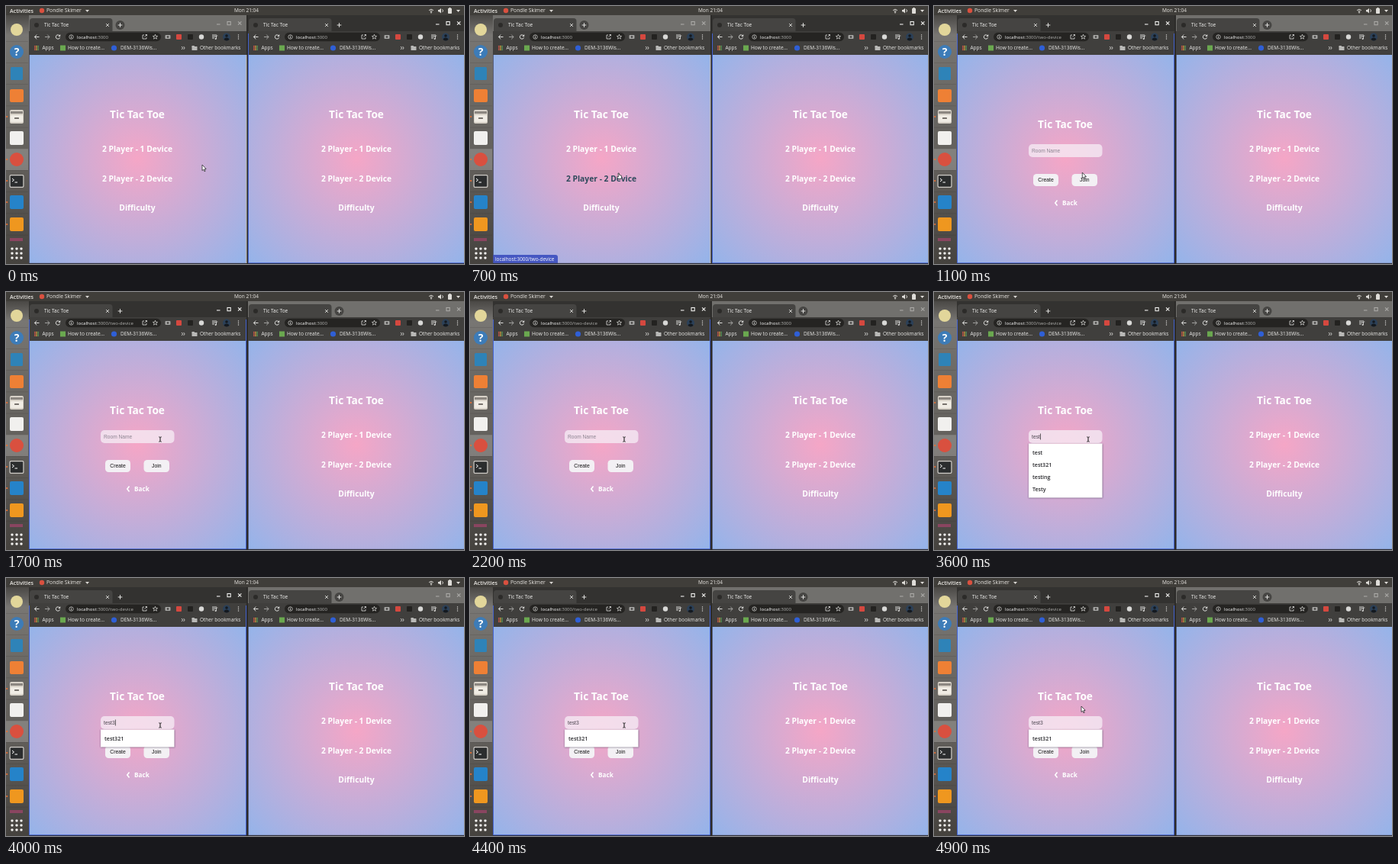
Write an HTML page with a canvas that moves like this. It is 600 px wide and 338 px high and loops after 5 s.

```html
<!DOCTYPE html>
<html lang="en">
<head>
<meta charset="utf-8">
<title>Tic Tac Toe</title>
<style>
html, body { margin: 0; width: 100%; height: 100%; overflow: hidden; background: #2c2b29; }
canvas { display: block; width: 600px; height: 338px; }
</style>
</head>
<body>
<canvas id="stage"></canvas>
<script>
const W = 600, H = 338, LOOP = 5000;
const NAVIGATE = 1000;
const UI = '"Open Sans", "Noto Sans", sans-serif';
const FORM = '"Liberation Sans", Arial, sans-serif';
const canvas = document.getElementById('stage');
const ctx = canvas.getContext('2d');
const ratio = window.devicePixelRatio || 1;
canvas.width = W * ratio;
canvas.height = H * ratio;

// Cursor path: time, x, y
const path = [
  [0, 257, 208], [100, 257, 208], [600, 194, 219], [1050, 194, 219],
  [1500, 202, 193], [4500, 202, 193], [4900, 193, 168], [5000, 193, 168]
];
// Typed text: time, value
const keys = [[2500, 't'], [2700, 'te'], [3000, 'tes'], [3200, 'test'], [3800, 'test3']];
const history = ['test', 'test321', 'testing', 'Testy'];

function rect(x, y, w, h, color, r = 0) {
  ctx.fillStyle = color;
  ctx.beginPath();
  ctx.roundRect(x, y, w, h, r);
  ctx.fill();
}

function circle(x, y, r, color) {
  ctx.fillStyle = color;
  ctx.beginPath();
  ctx.arc(x, y, r, 0, Math.PI * 2);
  ctx.fill();
}

function trace(points) {
  ctx.beginPath();
  for (let i = 0; i < points.length; i += 2) ctx.lineTo(points[i], points[i + 1]);
}

function line(points, color, width = 1) {
  trace(points);
  ctx.strokeStyle = color;
  ctx.lineWidth = width;
  ctx.stroke();
}

function poly(points, color) {
  trace(points);
  ctx.closePath();
  ctx.fillStyle = color;
  ctx.fill();
}

// y is the middle of the capitals
function text(str, x, y, size, color = '#fff', { weight = 400, align = 'left', font = UI } = {}) {
  ctx.font = `${weight} ${size}px ${font}`;
  ctx.textAlign = align;
  ctx.fillStyle = color;
  ctx.fillText(str, x, y + size * 0.357);
  return ctx.measureText(str).width;
}

function at(x, y, draw) {
  ctx.save();
  ctx.translate(x, y);
  draw();
  ctx.restore();
}

function topBar() {
  rect(0, 0, W, 12, '#403e3a');
  text('Activities', 5, 6, 7.1, '#eceae6', { weight: 600 });
  circle(47, 6, 3.2, '#d9503f');
  text('Pondle Skimer', 53, 6, 6.8, '#eceae6');
  poly([104, 5, 109, 5, 106.5, 8], '#d8d6d2');
  text('Mon 21:04', 315, 6, 6.5, '#eceae6', { align: 'center' });
  const c = '#dedcd8';
  ctx.strokeStyle = c;
  ctx.lineWidth = 1;
  for (const r of [2, 4]) {
    ctx.beginPath();
    ctx.arc(557, 8.5, r, -Math.PI * 0.75, -Math.PI * 0.25);
    ctx.stroke();
  }
  circle(557, 8.5, 0.9, c);
  poly([566, 5, 567.5, 5, 570, 3, 570, 9.5, 567.5, 7.5, 566, 7.5], c);
  ctx.beginPath();
  ctx.arc(570, 6.2, 2.4, -0.9, 0.9);
  ctx.stroke();
  rect(579, 3, 5, 7, c, 0.8);
  rect(580.5, 2, 2, 1, c);
  poly([590, 5, 595, 5, 592.5, 8], c);
}

function dock() {
  const g = ctx.createLinearGradient(0, 12, 0, H);
  g.addColorStop(0, '#4a4845');
  g.addColorStop(0.08, '#787673');
  g.addColorStop(0.3, '#6b6965');
  g.addColorStop(0.6, '#625f5b');
  g.addColorStop(1, '#45423e');
  rect(0, 12, 30, H - 12, g);
  for (let i = 0; i < 10; i++) rect(0, 46 + i * 28.2, 29, 0.6, 'rgba(30,28,26,.2)');
  rect(0, 187, 29, 28, 'rgba(255,255,255,.2)');

  circle(14, 31, 8, '#e2d69a');
  circle(14, 60, 9, '#3d7cb8');
  text('?', 14, 60, 14, '#fff', { weight: 700, align: 'center' });
  rect(6, 80, 16, 17, '#2e83b8', 1.5);
  rect(5, 109, 18, 17, '#ee8035', 2);
  rect(5, 136, 18, 18, '#d8d2c8', 2);
  rect(6, 138, 16, 3, '#8c8781');
  rect(6, 143, 16, 9, '#f0ece4', 1);
  rect(11, 146, 6, 2, '#77726c', 0.6);
  rect(5, 164, 18, 18, '#f1f0ee', 2);
  circle(14, 201, 9, '#d9503f');
  rect(4.5, 221, 19, 17, '#d0cdc8', 2);
  rect(5.7, 222.2, 16.6, 14.6, '#2b2d2e', 1);
  line([8, 226, 10.5, 228, 8, 230], '#fff', 1);
  line([11.5, 231, 15, 231], '#fff', 1);
  rect(5, 248, 18, 18, '#2583c9', 2);
  rect(5, 277, 18, 18, '#ef971f', 2);
  rect(5, 304, 17, 4, '#8a4560');
  for (const y of [145, 201, 229, 257, 286]) circle(1.2, y, 1.1, '#ee7033');
  for (let i = 0; i < 9; i++) rect(6.5 + (i % 3) * 6, 316.5 + Math.floor(i / 3) * 6, 3, 3, '#f4f3f1', 0.8);
}

function tabStrip(focused) {
  rect(30, 12, 285, 24, focused ? '#333230' : '#71706d');
  rect(31, 16, 108.5, 20, '#454442', 4);
  circle(40, 25, 3, '#2c2b29');
  text('Tic Tac Toe', 50, 25, 6.5, '#f4f4f2');
  const ink = focused ? '#f0f0ee' : '#aaa9a6';
  line([131, 23, 135, 27], '#d8d8d6', 0.9);
  line([135, 23, 131, 27], '#d8d8d6', 0.9);
  if (!focused) circle(149.5, 25, 6, '#464543');
  line([146.7, 25, 152.3, 25], '#e0e0de', 1);
  line([149.5, 22.2, 149.5, 27.8], '#e0e0de', 1);
  line([276, 24, 280.5, 24], ink, 1.1);
  ctx.strokeStyle = ink;
  ctx.strokeRect(290, 20.5, 4.2, 4.2);
  line([304, 20.3, 308.4, 24.7], ink, 1.1);
  line([308.4, 20.3, 304, 24.7], ink, 1.1);
}

function toolbar(route) {
  rect(30, 33, 285, 31, '#403f3d');
  const c = '#dededc', dim = '#a2a2a0';
  line([43.5, 40.5, 37.5, 40.5], c);
  line([40.3, 37.6, 37.4, 40.5, 40.3, 43.4], c);
  line([51, 40.5, 57, 40.5], dim);
  line([54.2, 37.6, 57.1, 40.5, 54.2, 43.4], dim);
  ctx.strokeStyle = c;
  ctx.lineWidth = 1;
  ctx.beginPath();
  ctx.arc(68, 40.5, 2.7, 0.3, 5.4);
  ctx.stroke();
  poly([71.2, 37, 71.2, 40, 68.4, 40], c);

  rect(78, 34.7, 125, 11.6, '#252422', 5.8);
  ctx.strokeStyle = c;
  ctx.lineWidth = 0.7;
  ctx.beginPath();
  ctx.arc(85.5, 40.5, 2.7, 0, Math.PI * 2);
  ctx.stroke();
  line([85.5, 40, 85.5, 42.2], c, 0.8);
  circle(85.5, 39, 0.5, c);
  const w = text('localhost', 93, 40.5, 6.1, '#fff');
  text(':3000' + route, 93 + w, 40.5, 6.1, '#aeaeac');
  line([181, 38, 179, 38, 179, 43, 184, 43, 184, 41], c, 0.8);
  line([181.5, 40.5, 184.5, 37.5], c, 0.8);
  line([182.5, 37.5, 184.5, 37.5, 184.5, 39.5], c, 0.8);
  const star = [];
  for (let i = 0; i <= 10; i++) {
    const r = i % 2 ? 1.4 : 3.3, a = i * Math.PI / 5 - Math.PI / 2;
    star.push(195.5 + r * Math.cos(a), 40.5 + r * Math.sin(a));
  }
  line(star, c, 0.7);

  rect(208.5, 38, 7, 5, '#a5a5a3', 1);
  circle(212, 40.5, 1.3, '#403f3d');
  rect(223, 37, 7, 7, '#d5483f', 1);
  rect(238, 37, 7, 7, '#232220', 1);
  circle(256, 40.5, 3.2, '#d9d9d7');
  for (let i = 0; i < 3; i++) line([270, 38 + i * 2, i < 2 ? 276 : 273, 38 + i * 2], c, 0.9);
  line([275.5, 43, 275.5, 39, 277.3, 39], c, 0.8);
  circle(274.7, 43, 1, c);

  ctx.save();
  ctx.beginPath();
  ctx.arc(289, 40.5, 5, 0, Math.PI * 2);
  ctx.clip();
  rect(284, 35, 11, 11, '#2b4058');
  circle(289, 39, 1.8, '#14191f');
  circle(289, 45, 3.6, '#14191f');
  ctx.restore();
  for (const y of [38, 40.5, 43]) circle(304.5, y, 0.7, c);
}

function bookmarks() {
  const hues = ['#d9574a', '#e0a83e', '#58a05c'];
  for (let i = 0; i < 9; i++) rect(37 + (i % 3) * 2.2, 52 + Math.floor(i / 3) * 2.2, 1.6, 1.6, hues[i % 3]);
  const c = '#ececea';
  text('Apps', 47.5, 55, 6.5, c);
  rect(71, 51.5, 7, 7, '#6aa84f');
  text('How to create...', 81, 55, 6.6, c);
  circle(141.5, 55, 3.6, '#2f5fd6');
  text('DEM-3136Wis...', 150, 55, 6.5, c);
  line([230, 53, 231.7, 55, 230, 57], c, 0.8);
  line([232.5, 53, 234.2, 55, 232.5, 57], c, 0.8);
  rect(243.5, 52, 3.5, 2, '#b9b9b7', 0.5);
  rect(243.5, 53, 7, 5, '#b9b9b7', 0.6);
  text('Other bookmarks', 254, 55, 6.5, c);
}

function backdrop() {
  const g = ctx.createRadialGradient(172, 200, 0, 172, 200, 197);
  g.addColorStop(0, '#f5a6c6');
  g.addColorStop(1, '#94b4ea');
  rect(30.5, 64, 283.5, 273, g);
}

function browser(focused, route, page) {
  tabStrip(focused);
  toolbar(route);
  bookmarks();
  backdrop();
  page();
  if (focused) {
    line([30.5, 36, 30.5, 336.7, 314.5, 336.7, 314.5, 36], '#4362cf', 1);
  } else {
    line([30.5, 64, 30.5, 337, 314, 337], 'rgba(70,75,110,.5)', 1);
    rect(314, 64, 1.5, 273, '#b8b9c0');
  }
}

function heading(str, y, size, color) {
  text(str, 172, y, size, color, { weight: 700, align: 'center' });
}

function menu(hover) {
  heading('Tic Tac Toe', 142, 13.7);
  heading('2 Player - 1 Device', 187.5, 10.3);
  heading('2 Player - 2 Device', 226, 10.3, hover ? '#2f4a5c' : '#fff');
  heading('Difficulty', 264.5, 10.3);
  if (hover) {
    rect(30, 326, 85, 11, '#4557c2', [0, 3, 0, 0]);
    text('localhost:3000/two-device', 33, 331.5, 6.4);
  }
}

function button(label, x, w) {
  rect(x, 220, w, 16, '#f3f0f4', 4.5);
  text(label, x + w / 2, 228, 6.8, '#111', { font: FORM, align: 'center' });
}

function suggestions(typed) {
  const items = history.filter(s => s.toLowerCase().startsWith(typed));
  const h = items.length * 16 + 7;
  ctx.save();
  ctx.shadowColor = 'rgba(40,30,60,.55)';
  ctx.shadowBlur = 2 * ratio;
  ctx.shadowOffsetY = 0.6 * ratio;
  rect(124, 198.5, 96.5, h, '#fff');
  ctx.restore();
  items.forEach((s, i) => text(s, 129, 210 + i * 16, 7.1, '#26262a', { weight: 600 }));
}

function room(t) {
  heading('Tic Tac Toe', 155, 13.7);
  rect(124, 181, 96.5, 17, 'rgba(247,236,245,.78)', 5);
  button('Create', 130, 33);
  button('Join', 180.5, 33.5);
  line([161.5, 254.5, 158.8, 258, 161.5, 261.5], '#fff', 1.6);
  text('Back', 168, 258, 8.2, '#fff', { weight: 700 });

  const key = keys.filter(k => k[0] <= t).pop();
  if (!key) {
    text('Room Name', 128, 189.5, 6.65, '#8d8391', { font: FORM });
    return;
  }
  const [since, typed] = key;
  const w = text(typed, 128, 189.5, 6.75, '#4c454f', { font: FORM });
  if ((t - since) % 1000 < 500 && t < 4300) rect(128.3 + w, 185.5, 0.7, 8, '#222');
  suggestions(typed);
}

function cursorAt(t) {
  const i = Math.max(1, path.findIndex(p => p[0] > t));
  const [t0, x0, y0] = path[i - 1], [t1, x1, y1] = path[i];
  const u = (t - t0) / (t1 - t0), e = u * u * (3 - 2 * u);
  return [x0 + (x1 - x0) * e, y0 + (y1 - y0) * e];
}

function outlined(points) {
  poly(points, '#fff');
  line([...points, points[0], points[1]], '#2a2a2e', 0.8);
}

function cursor(x, y, kind) {
  at(x, y, () => {
    if (kind === 'arrow') {
      outlined([0, 0, 0, 7.6, 1.7, 6, 3, 8.8, 4.2, 8.2, 3, 5.6, 5.2, 5.4]);
    } else if (kind === 'hand') {
      outlined([0, 0, 1.2, 0, 1.8, 2.6, 4.4, 3.2, 4.6, 5.2, 3.6, 7.6, 0.6, 7.6, -1.6, 5, -0.9, 4.2, 0.4, 5]);
    } else {
      line([-1.8, -3.2, 0, -2.6, 1.8, -3.2], '#222', 0.9);
      line([0, -2.6, 0, 2.6], '#222', 1.1);
      line([-1.8, 3.2, 0, 2.6, 1.8, 3.2], '#222', 0.9);
    }
  });
}

function render(t) {
  ctx.setTransform(ratio, 0, 0, ratio, 0, 0);
  rect(0, 0, W, H, '#2c2b29');
  const inRoom = t >= NAVIGATE;
  const [x, y] = cursorAt(t);
  const hover = !inRoom && x < 218 && y > 214;
  const inInput = inRoom && x > 124 && x < 220 && y > 181 && y < 198;

  dock();
  browser(inRoom, inRoom ? '/two-device' : '', () => inRoom ? room(t) : menu(hover));
  at(287, 0, () => browser(!inRoom, '', () => menu(false)));
  topBar();
  cursor(x, y, hover ? 'hand' : inInput ? 'beam' : 'arrow');
}

const start = performance.now();
function tick() {
  render((performance.now() - start) % LOOP);
  requestAnimationFrame(tick);
}
tick();
</script>
</body>
</html>
```
